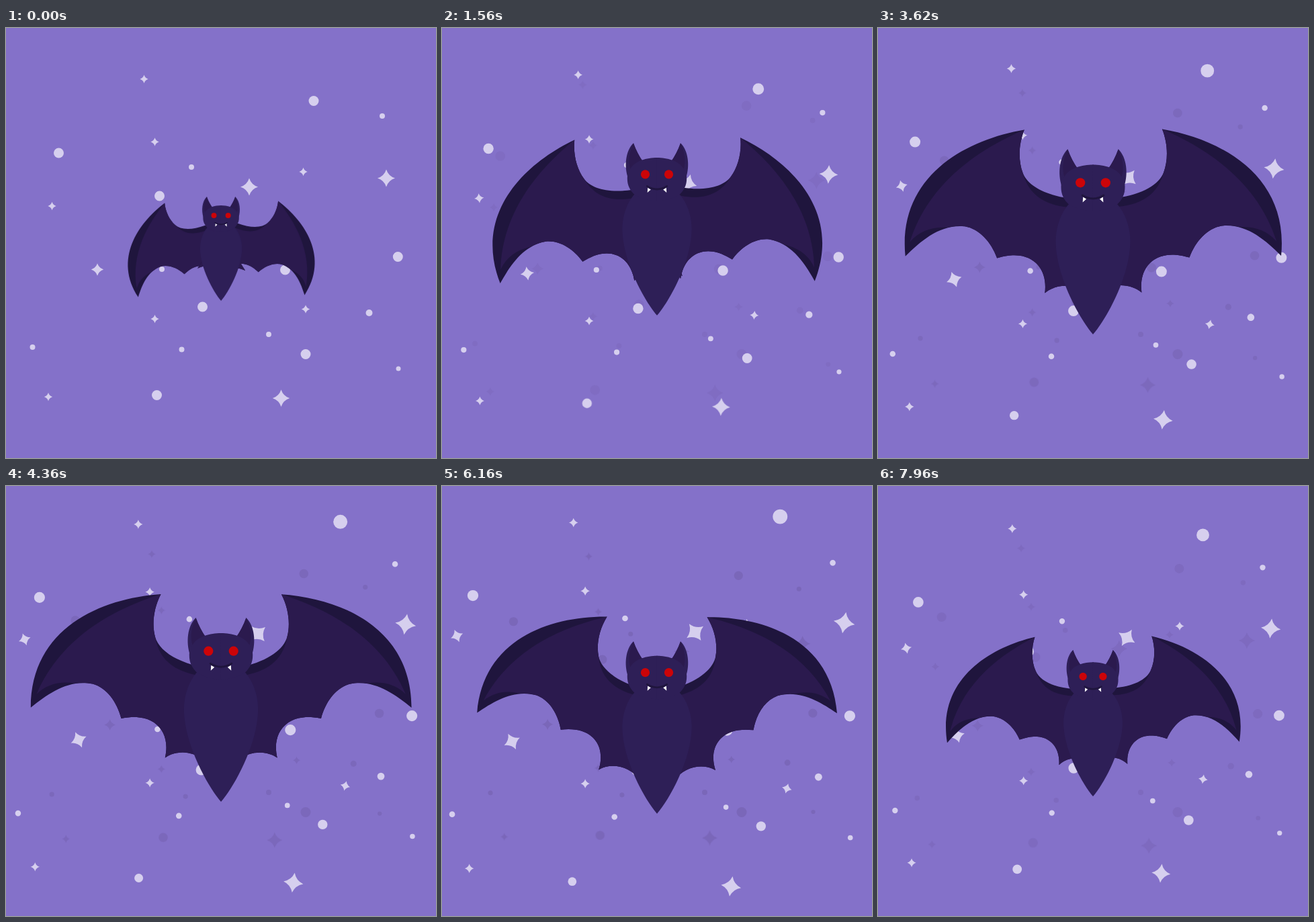
These frames come from a looping animation (640x640 px, 8000 ms). An HTML page:

```html
<!DOCTYPE html>
<html lang="en">
<head>
<meta charset="utf-8">
<title>Bat in a purple night</title>
<style>
  html, body { margin: 0; width: 100%; height: 100%; overflow: hidden; background: #8471c9; }
  svg { display: block; width: 100vw; height: 100vh; --p: 0; --flap: 0; --y: 0; --s: 1; }

  /* --p runs from 0 (at rest) to 1 (spread out) */
  .sky { fill: currentColor; stroke: none; transform-origin: 316px 320px; }
  .glow { color: #d6cfee; transform: scale(calc(1 + .1 * var(--p))); }
  .shade { color: #7a66b8; opacity: calc(.2 + .8 * var(--p)); }
  .shrink { transform: scale(calc(1 - .133 * var(--p))); }
  .rest { --p: 0; }
  .dots { stroke: currentColor; stroke-linecap: round; }
  .drift {
    transform:
      translate(calc(var(--x) * 1px + var(--p) * var(--dx) * 1px), calc(var(--y0) * 1px + var(--p) * var(--dy) * 1px))
      rotate(calc(var(--p) * var(--turn, 0) * 1deg))
      scale(calc(var(--size, 1) + var(--p) * var(--grow, 0)));
  }

  .bat { transform: translate(320px, calc(var(--y) * 1px)) scale(var(--s)) translate(-320px, -298.75px); }
  .wing { transform-origin: 287.5px 250.5px; transform: rotate(calc(var(--flap) * 1deg)); }
  .mirror { transform-origin: 320px 0; transform: scale(-1, 1); }
  .lag { transform: translate(calc(2px - 2px * var(--p)), calc(7px * var(--p) - 5.4px)); }

  .edge { fill: #1f153d; }
  .skin { fill: #2b1a4e; }
  .fur { fill: #2e1f57; }
  .eye { fill: #cc0408; }
  .fang { fill: #fff; }
  .smile { fill: none; stroke: #1f153d; stroke-width: 3; stroke-linecap: round; }
</style>
</head>
<body>
<svg id="stage" viewBox="0 0 640 640">
  <defs>
    <circle id="dot" r="7.5"/>
    <path id="star" d="M0-6.2Q1.5-1.5 6.2 0Q1.5 1.5 0 6.2Q-1.5 1.5-6.2 0Q-1.5-1.5 0-6.2Z"/>
    <g id="sky">
      <path class="dots" stroke-width="15" d="M228.5 250h.01M415.5 360h.01M583.3 340.5h.01M292.5 415h.01"/>
      <path class="dots" stroke-width="8" d="M560 131h.01M276 207h.01M232 359h.01M39.5 475h.01M261.5 478.5h.01"/>
      <path class="dots" stroke-width="10" d="M540.5 424h.01"/>
      <path class="dots" stroke-width="7" d="M584 507h.01"/>
      <use href="#star" x="205.5" y="76"/>
      <use href="#star" x="221.5" y="169.5"/>
      <use href="#star" x="442.5" y="214"/>
      <use href="#star" x="221.5" y="433"/>
      <use href="#star" class="drift" style="--x:63; --y0:549; --dx:0; --dy:0"/>
      <use href="#dot" class="drift" style="--x:458; --y0:108.5; --dx:34; --dy:-46; --grow:.38"/>
      <use href="#dot" class="drift" style="--x:78.5; --y0:186; --dx:-12; --dy:-11.5"/>
      <use href="#dot" class="drift" style="--x:224.5; --y0:546.5; --dx:-23.5; --dy:23; --grow:-.25"/>
      <use href="#star" class="drift" style="--x:566; --y0:223.5; --dx:11; --dy:-12; --size:2.1; --grow:.3; --turn:11"/>
      <use href="#star" class="drift" style="--x:362; --y0:236.5; --dx:11; --dy:-12; --size:2.1; --grow:.17; --turn:62"/>
      <use href="#star" class="drift" style="--x:409.5; --y0:551; --dx:13; --dy:25.5; --size:2.05; --grow:.2; --turn:10"/>
      <use href="#star" class="drift" style="--x:136; --y0:359.5; --dx:-16.5; --dy:18; --size:1.48; --grow:.5; --turn:-30"/>
      <use href="#star" class="drift" style="--x:68.5; --y0:265; --dx:-25.5; --dy:-38.5; --grow:.5; --turn:-24"/>
      <use href="#star" class="drift" style="--x:446; --y0:418.5; --dx:58; --dy:24; --grow:.12; --turn:18"/>
    </g>
    <g id="wing">
      <path class="edge" d="M202 140.5C115 167 22 235 49 352C70 325 95 297 132 296C154 297 174 314 186 337
        C200 331 210 329 219 329C245 329 264 348 264 380C272 371 284 366 296 365C314 364 330 371 342 384
        L337 361L310 236L283 234C243 234 217 222 208 205C199 188 196 164 202 140.5Z"/>
      <path class="skin" d="M202 140.5C142 176 70 235 53 330C65 312 82 303 106 301Q118 296 132 296
        C154 297 174 314 186 337C200 331 210 329 219 329C245 329 264 348 264 380C272 371 284 366 296 365
        C314 364 330 371 342 384L337 361L310 248L283 247.5C243 249 220 234 208 205C199 188 196 164 202 140.5Z"/>
    </g>
    <g id="face">
      <path class="fur" d="M282 159.5C269 172 267 197 273 215L300 200L298 190C291 181 286 171 282 159.5Z"/>
      <path class="skin" d="M282 160C275 173 273 190 277 201C283 195 290 191 297 189.5C291 180 286 171 282 160Z"/>
      <path class="fur" d="M321 183H320C304 183 284 188 277 201C273 206 272 211 272 216C272 228 276 235 284 243Q302 253 321 253Z"/>
      <circle class="eye" cx="301" cy="210" r="7.2"/>
      <path class="fang" d="M305 231.5L304.5 239.5L310 234.5Z"/>
    </g>
  </defs>

  <g class="sky shade">
    <path class="dots" stroke-width="15" d="M446 485.5h.01"/>
    <path class="dots" stroke-width="8" d="M391 456h.01"/>
    <g class="sky shrink"><use href="#sky" class="rest"/></g>
  </g>
  <g class="sky glow">
    <use href="#sky"/>
    <use href="#dot" class="drift" style="--x:446; --y0:485.5; --dx:18; --dy:6.5; --grow:-.14"/>
    <use href="#dot" class="drift" style="--x:391; --y0:456; --dx:26; --dy:10.5; --size:.53; --grow:-.07"/>
  </g>

  <g class="bat">
    <use href="#wing" class="wing"/>
    <g class="lag"><g class="mirror"><use href="#wing" class="wing"/></g></g>
    <path class="fur" d="M320 225C285 225 264 262 264 298C264 350 300 415 320 438C340 415 376 350 376 298C376 262 355 225 320 225Z"/>
    <use href="#face"/>
    <use href="#face" class="mirror"/>
    <path class="smile" d="M304 229Q320 239 336 229"/>
  </g>
</svg>
<script>
const LOOP = 8000, CYCLE = 1120, FIRST = 120, HOLD = 109;
const PEAK = 50; // pose at which everything is spread widest

// key poses: pose number, value
const HEIGHT = [[0, 328.5], [18, 288.5], [39, 333], [PEAK, 361.5], [71, 353]];
const SCALE = [[0, .557], [16, 1.005], [39, .984], [PEAK, .965], [71, .783]];

const stage = document.getElementById('stage');

function track(keys, n) {
  const i = Math.max(1, keys.findIndex(([at]) => at >= n));
  const [n0, v0] = keys[i - 1], [n1, v1] = keys[i];
  return v0 + (v1 - v0) * (n - n0) / (n1 - n0);
}

// rises to 1 at the peak, then falls back within the given number of poses
const swing = (n, fall) => n < PEAK ? n / PEAK : 1 - (n - PEAK) / fall;

// ten held poses in every cycle
function poseAt(time) {
  if (time < FIRST) return 0;
  const since = time - FIRST;
  return 1 + 10 * Math.floor(since / CYCLE) + Math.min(9, Math.floor(since % CYCLE / HOLD));
}

function draw(n) {
  const vars = {
    p: swing(n, 43),
    flap: 42.1 * swing(n, 47) ** .95 - 20.2,
    y: track(HEIGHT, n),
    s: track(SCALE, n)
  };
  for (const key in vars) stage.style.setProperty('--' + key, vars[key]);
}

let start;
function tick(now) {
  start ??= now;
  draw(poseAt((now - start) % LOOP));
  requestAnimationFrame(tick);
}
draw(0);
requestAnimationFrame(tick);
</script>
</body>
</html>
```
